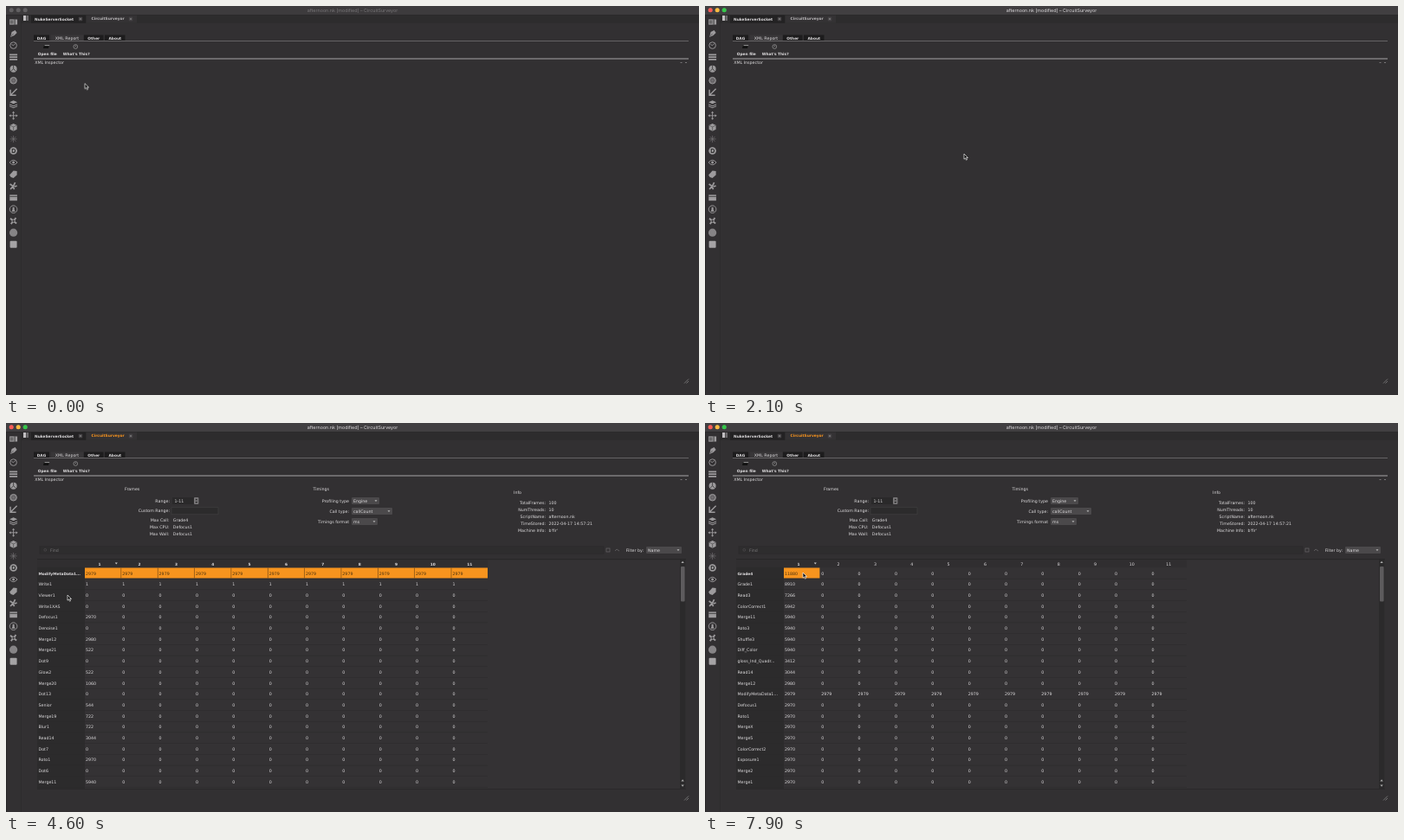
These frames come from a looping animation (800x450 px, 8 s). An HTML page:

```html
<!DOCTYPE html>
<html lang="en">
<head>
<meta charset="utf-8">
<title>XML report viewer</title>
<style>
html, body { margin: 0; width: 100%; height: 100%; overflow: hidden; background: #323032; }
svg { display: block; width: 800px; height: 450px; }
text { font: 4.75px "DejaVu Sans", sans-serif; fill: #dedcde; text-rendering: geometricPrecision; white-space: pre; }
.b { font-size: 4.35px; font-weight: bold; }
.mid { text-anchor: middle; }
.end { text-anchor: end; }
.title { font: 5.35px Inter, sans-serif; text-anchor: middle; }
.tiny { font-size: 2.9px; }
.soft { fill: #bab8ba; }
.dim { fill: #787678; }
.hot { fill: #f7941e; }
.dark { fill: #49300f; }
.ico { fill: none; stroke: #9d9b9d; stroke-width: .9; }
.ico .f { fill: #9d9b9d; stroke: none; }

#active, #lights, #report, #plain, #rowTop, #sorted, #cell, #arrow, #cross { animation: 8s step-end infinite; }
#active { animation-name: active; }
#lights { animation-name: lights; }
#report { animation-name: report; }
#plain { animation-name: plain; }
#rowTop { animation-name: rowTop; }
#sorted { animation-name: sorted; }
#cell { animation-name: cell; }
#arrow { animation-name: arrow; }
#cross { animation-name: cross; }
#dialog { transform-origin: 398px 222px; animation: dialog 8s linear infinite; }
#pointer { animation: pointer 8s ease-in-out infinite; }

@keyframes active { 0% { visibility: hidden } 6.25%, 100% { visibility: visible } }
/* The window buttons go grey while the dialog is up. */
@keyframes lights { 0% { visibility: hidden } 6.25% { visibility: visible } 11.25% { visibility: hidden } 24%, 100% { visibility: visible } }
@keyframes report { 0% { visibility: hidden } 30%, 100% { visibility: visible } }
@keyframes plain { 0% { visibility: hidden } 30% { visibility: visible } 50%, 100% { visibility: hidden } }
@keyframes rowTop { 0% { visibility: hidden } 50% { visibility: visible } 68.75%, 100% { visibility: hidden } }
@keyframes sorted { 0% { visibility: hidden } 68.75% { visibility: visible } 93.75%, 100% { visibility: hidden } }
@keyframes cell { 0% { visibility: hidden } 93.75%, 100% { visibility: visible } }
@keyframes arrow { 0% { visibility: visible } 43.75% { visibility: hidden } 46.25%, 100% { visibility: visible } }
@keyframes cross { 0% { visibility: hidden } 43.75% { visibility: visible } 46.25%, 100% { visibility: hidden } }
@keyframes dialog {
  0%, 11.25% { opacity: 0; transform: scale(.92) }
  12.5% { opacity: .66; transform: scale(1) }
  13.75%, 23.1% { opacity: 1; transform: scale(1.08) }
  24.6%, 100% { opacity: 0; transform: scale(1.08) }
}
@keyframes pointer {
  0%, 2.5% { transform: translate(91px, 89.5px) }
  7.5% { transform: translate(55px, 49px) }
  12.5%, 15.6% { transform: translate(53px, 47.5px) }
  20%, 23.1% { transform: translate(338px, 201px) }
  26.25% { transform: translate(299px, 171px) }
  43.75%, 46.25% { transform: translate(83px, 180.5px) }
  48.75%, 56.25% { transform: translate(76px, 172px) }
  57.5%, 61.25% { transform: translate(71px, 199px) }
  66.25%, 71.25% { transform: translate(107px, 160px) }
  78.75%, 90% { transform: translate(75.5px, 171.5px) }
  93.1%, 100% { transform: translate(113px, 173px) }
}
</style>
</head>
<body>
<svg id="stage" viewBox="0 0 800 450"></svg>
<script>
const APP = "CircuitSurveyor";
const COLS = 11, COL_W = 42.35, ROW_H = 12.7, LEFT = 91, TOP = 167.5;

// Text is placed by its vertical centre.
const text = (x, y, s, cls = "") => `<text x="${x}" y="${y + 1.7}" class="${cls}">${s}</text>`;
const rect = (x, y, w, h, fill, extra = "") =>
  `<rect x="${x}" y="${y}" width="${w}" height="${h}" fill="${fill}" ${extra}/>`;
const circle = (x, y, r, fill, extra = "") => `<circle cx="${x}" cy="${y}" r="${r}" fill="${fill}" ${extra}/>`;
const path = (d, extra = "") => `<path d="${d}" ${extra}/>`;
const group = (id, body) => `<g id="${id}">${body}</g>`;

const lights = colors => colors.map((c, i) => circle(6.2 + i * 8, 4.8, 2.5, c)).join("");
const greyLights = lights(["#626062", "#626062", "#626062"]);
const titleText = cls => text(400, 4.8, `afternoon.nk [modified] – ${APP}`, "title " + cls);

// Toolbar glyphs, each centred on 0,0.
const glyphs = [
  '<path class="f" d="M-4.5-3H4.5V3H-4.5Z"/><path stroke="#333" d="M-4-1H0M-4 1H0M1.5-3V3"/>',
  '<path class="f" d="M-3.5 4-2-2 2-4 4-1 1 2Z"/><path stroke="#333" stroke-width=".6" d="M-3 3 0 0"/>',
  '<circle r="3.8"/><path d="M0 0 2-2M-2-1 0 0"/>',
  '<path stroke-width="1.7" d="M-4.5-2.7H4.5M-4.5 0H4.5M-4.5 2.7H4.5"/>',
  '<circle class="f" r="4"/><path stroke="#333" stroke-width=".8" d="M0-4V0L-3 3M0 0 3 3"/>',
  '<circle r="3.8" fill="#747274"/><circle r="1.8" stroke="#5c5a5c"/>',
  '<path stroke-width="1.4" d="M4-4-3 3M-3.5-3V3.5H3"/>',
  '<path class="f" d="M0-4 4.5-2 0 0-4.5-2ZM-4.5 0 0 2 4.5 0V1L0 3-4.5 1ZM-4.5 2 0 4 4.5 2V3L0 5-4.5 3Z"/>',
  '<path d="M-4 0H4M0-4V4"/><path class="f" d="M-5 0-3-1.6V1.6ZM5 0 3-1.6V1.6ZM0-5-1.6-3H1.6ZM0 5-1.6 3H1.6Z"/>',
  '<path class="f" d="M0-4.3 4-2.3V2.3L0 4.3-4 2.3V-2.3Z"/><path stroke="#444" stroke-width=".6" d="M-4-2.3 0-.5 4-2.3M0-.5V4"/>',
  '<path stroke="#747274" stroke-width=".7" d="M-4 0H4M0-4V4M-2.8-2.8 2.8 2.8M-2.8 2.8 2.8-2.8"/>',
  '<circle class="f" r="4.3"/><path stroke="#333" stroke-width="1.1" d="M-1.3-2V2H0Q2 2 2 0T0-2Z"/>',
  '<path d="M-4.5 0Q0-5.4 4.5 0Q0 5.4-4.5 0Z"/><circle class="f" r="1.4"/>',
  '<path class="f" d="M-4.5 1 0-4 4-3.5 4 1 0 4.5-3 3.5Z"/>',
  '<path stroke-width="1.7" d="M-3.5 4 0 0M-4-2-1 0 1 4M0 0 2-4M1 1 4 0"/>',
  '<path class="f" d="M-4.3-3.2H4.3V3.6H-4.3Z"/><path stroke="#333" stroke-width=".8" d="M-4.3-1.2H4.3"/>',
  '<circle r="4.3"/><path class="f" d="M-1-2.5H1V0L2 2.7H-2L-1 0Z"/>',
  '<path stroke-width="1.9" d="M-3.6-2.8-1-1M2.8-3.6 1-1M3.6 2.8 1 1M-2.8 3.6-1 1"/><circle r="1.6"/>',
  '<circle r="4.6" fill="#868486" stroke="none"/>',
  '<rect x="-4" y="-4" width="8" height="8" rx="1" fill="#a5a3a5" stroke="none"/>'
];
const toolbar = glyphs.map((g, i) =>
  `<g class="ico" transform="translate(8.6 ${(18.5 + 13.54 * i).toFixed(2)})">${g}</g>`).join("");

const closeBox = x => rect(x - 2.2, 12.8, 4.4, 4.4, "#454345") +
  path(`M${x - 1} 14l2 2m0-2l-2 2`, 'stroke="#888" stroke-width=".6"');

const subTab = (x, w, s, on) => rect(x, 33.5, w, 7, on ? "#383638" : "#1d1c1d") +
  text(x + w / 2, 37.3, s, on ? "mid" : "mid b");

const frame =
  rect(0, 0, 800, 450, "#323032") +
  rect(0, 0, 800, 10, "#3d3b3d") +
  greyLights + titleText("dim") +
  group("active", rect(0, 0, 800, 10, "#413f41") + greyLights + titleText("")) +
  group("lights", lights(["#fc5b57", "#fdbc40", "#34c84a"])) +
  rect(0, 10, 800, .7, "#272627") + rect(0, 10, 1, 440, "#282728") +
  rect(17, 10.5, 783, 9.5, "#2d2c2d") + rect(17, 10, .6, 440, "#2b2a2b") +
  toolbar +
  rect(20, 11, 3, 6, "#c0bec0") + rect(23.4, 11, 2.6, 6, "#6c6a6c") +
  rect(29, 10.7, 63, 9, "#232223") + rect(93, 10.7, 58, 9, "#343234") +
  text(33, 15, "NukeServerSocket", "b") + text(98.5, 14.7, APP, "b soft") +
  closeBox(86) + closeBox(144) +
  subTab(32, 18, "DAG") + subTab(52, 37, "XML Report", true) +
  subTab(90, 22.5, "Other") + subTab(114, 23.5, "About") +
  rect(32, 40, 756, 1, "#656365") + rect(32, 60.5, 756, 1, "#a5a3a5") +
  path("M44 45h6l-1 4h-6z", 'fill="#111"') + path("M44.5 45.6h5.6", 'stroke="#bbb" stroke-width=".8"') +
  circle(80.3, 47, 2.4, "none", 'stroke="#aaa" stroke-width=".6"') + path("M80.3 45.6v1.6", 'stroke="#aaa" stroke-width=".7"') +
  text(36.8, 55, "Open file", "b") + text(65.7, 55, "What's This?", "b") +
  text(33.2, 65.3, "XML Inspector") +
  rect(778.5, 65, 2, .8, "#8a888a") + rect(784, 65, 2, .8, "#8a888a") +
  path("M783 436.5l5-5M785.5 436.5l2.5-2.5", 'stroke="#858385" stroke-width=".8"');

const combo = (x, y, w, s) => rect(x, y - 4, w, 8, "#4b494b", 'rx="1"') + text(x + 2, y, s) +
  path(`M${x + w - 5.5} ${y - .8}h3l-1.5 1.8z`, 'fill="#bbb"');
const pairs = (xr, xl, y, step, list) => list.map(([k, v], i) =>
  text(xr, y + i * step, k, "end") + text(xl, y + i * step, v)).join("");

const form =
  rect(95, 11, 45, 8, "#343234") + text(98.5, 14.7, APP, "b hot") +
  text(137, 76.2, "Frames") + text(354.5, 76.2, "Timings") + text(586, 80, "Info") +
  rect(192, 86, 31, 8, "#2a292a") + rect(217, 86, 5.5, 8, "#777577", 'rx="1"') +
  path("M218.4 89.2l1.4-1.7 1.4 1.7zM218.4 91l1.4 1.7 1.4-1.7z", 'fill="#222"') +
  rect(191, 97.8, 54, 8, "#2c2b2c", 'stroke="#464446" stroke-width=".5"') +
  pairs(189, 194.5, 90.2, 0, [["Range:", "1-11"]]) + text(189, 101.6, "Custom Range:", "end") +
  pairs(188.5, 192.8, 112.2, 8, [["Max Call:", "Grade4"], ["Max CPU:", "Defocus1"], ["Max Wall:", "Defocus1"]]) +
  pairs(396, 0, 90, 12, [["Profiling type", ""], ["Call type:", ""], ["Timings format", ""]]) +
  combo(399, 90, 32, "Engine") + combo(399, 102, 47, "callCount") + combo(399, 114, 30, "ms") +
  pairs(623, 626.5, 92, 8, [["TotalFrames:", "100"], ["NumThreads:", "10"], ["ScriptName:", "afternoon.nk"],
    ["TimeStored:", "2022-04-17 14:57:21"], ["Machine Info:", "b'fir'"]]) +
  rect(39, 142.8, 651, 8.4, "#2e2d2e", 'stroke="#282728" stroke-width=".5"') +
  circle(45.3, 146.8, 1.4, "none", 'stroke="#555355" stroke-width=".6"') + text(51, 147, "Find", "dim") +
  rect(693, 145, 4, 4, "none", 'stroke="#686668" stroke-width=".7"') +
  path("M703 148l2-2 3 2", 'fill="none" stroke="#686668" stroke-width=".8"') +
  text(736, 147, "Filter by:", "end") + combo(739, 147, 41, "Name") +
  rect(36, 157.5, 749, 266, "#343234") + rect(36, 157.3, 749, .8, "#242324") +
  rect(36, 158, 520, 9.2, "#302e30") + rect(36, 167, 55, 256, "#2c2b2c") +
  rect(778, 158, 6.5, 265, "#2b2a2b") + rect(779, 166, 4.6, 40.5, "#5d5b5d", 'rx="1"') +
  path("M779.4 162l1.7-2.3 1.7 2.3zM779.4 414.5l1.7-2.3 1.7 2.3zM779.4 418.5l1.7 2.3 1.7-2.3z", 'fill="#aaa"') +
  rect(36, 423, 749, .7, "#272627");

const parse = s => s.split(" ").map(r => r.split(":"));
const loaded = parse("ModifyMetaData1...:2979 Write1:1 Viewer1:0 Write1XAS:0 Defocus1:2970 Denoise1:0 Merge12:2980 " +
  "Merge21:522 Dot9:0 Glow2:522 Merge20:1060 Dot13:0 Senior:544 Merge19:722 Blur1:722 Read14:3044 Dot7:0 " +
  "Roto1:2970 Dot6:0 Merge11:5940");
const ranked = parse("Grade4:11880 Grade1:8910 Read3:7266 ColorCorrect1:5942 Merge11:5940 Roto3:5940 Shuffle3:5940 " +
  "Diff_Color:5940 gloss_Ind_Quadr...:3412 Read14:3044 Merge12:2980 ModifyMetaData1...:2979 Defocus1:2970 Roto1:2970 " +
  "MergeX:2970 Merge5:2970 ColorCorrect2:2970 Exposure1:2970 Merge2:2970 Merge1:2970");

// Highlights `width` cells of row `sel`.
function table(rows, sel = -1, width = COLS) {
  let out = path("M125.8 161.6h3l-1.5 1.8z", 'fill="#ccc"');
  for (let c = 0; c < COLS; c++) {
    const bold = sel >= 0 && c < width ? " b" : "";
    out += text(c ? 111.7 + COL_W * c : 108, 162.8, c + 1, "mid" + bold);
  }
  rows.forEach(([name, value], r) => {
    const y = TOP + r * ROW_H, mid = y + 6.3, on = r === sel;
    out += rect(36, y + ROW_H - .3, 520, .5, "#2a292a");
    if (on) out += rect(LEFT, y, width === 1 ? 41.4 : 465, 12, "#f7941e");
    out += text(37.5, mid, name, on ? "b" : "");
    for (let c = 0; c < COLS; c++) {
      const lit = on && c < width;
      const same = name.startsWith("Modify") || name === "Write1";
      if (lit && c) out += rect(LEFT + COL_W * c - .8, y, .6, 12, "#6b4314");
      out += text((LEFT + .9 + COL_W * c).toFixed(2), mid, c && !same ? 0 : value, lit ? "dark" : "");
    }
  });
  return out;
}

const files = ["reading.xml", "profile_noon.xml", "profile_late.xml", "sample_comp_long.xml", "sample_comp_two.xml"];
const dialog =
  rect(279, 171, 238, 105, "#000", 'rx="4" opacity=".14"') +
  rect(281, 170, 234, 102, "#2d2b2d", 'rx="2"') + rect(281, 170, 234, 6, "#343234", 'rx="2"') +
  ["#6b5150", "#6b5f4c", "#4c8a56"].map((c, i) => circle(284.5 + i * 4, 173, 1.2, c)).join("") +
  text(398, 173, "Open File", "tiny mid dim") +
  [288, 294.5, 301, 307.5].map(x => circle(x, 182.3, 1.7, "#a5a3a5")).join("") +
  rect(285, 187, 41, 63, "#302e30") + rect(327, 187, 184, 63, "#302e30") +
  ["Home", "Work", "Comp"].map((s, i) => rect(286.5, 188 + i * 5.6, 4, 4, "#a9a7a9") + text(293, 190 + i * 5.6, s, "tiny dim")).join("") +
  text(329, 188.8, "Name", "tiny soft") + text(414, 188.8, "Size", "tiny soft") + text(428, 188.8, "Modified", "tiny soft") +
  files.map((s, i) => text(329, 192.3 + i * 3, s, "tiny") + text(414, 192.3 + i * 3, "82 KB", "tiny") +
    text(428, 192.3 + i * 3, "4/17/22 2:57 PM", "tiny")).join("") +
  text(286, 252.5, "comp/reports/", "tiny dim") +
  rect(286, 256.7, 223, 3.3, "#2a241d", 'stroke="#7d5020" stroke-width=".5"') + rect(286, 256.6, 91, 3.6, "#d9832a") +
  text(286, 264.6, "Files (*.xml)", "tiny soft") +
  rect(473, 262.4, 16, 4.6, "#4b494b", 'rx="1"') + rect(492, 262.4, 17, 4.6, "#4b494b", 'rx="1"') +
  text(481, 264.7, "Open", "tiny mid soft") + text(500.5, 264.7, "Cancel", "tiny mid soft");

const pointer =
  group("arrow", path("M0 0V6.2L1.5 4.9 2.5 7.2 3.6 6.7 2.6 4.5H4.5Z", 'fill="#111" stroke="#eee" stroke-width=".7"')) +
  group("cross", path("M-3.5 0H3.5M0-3.5V3.5", 'stroke="#111" stroke-width="2.6"') +
    path("M-3.5 0H3.5M0-3.5V3.5", 'stroke="#eee" stroke-width="1.1"'));

document.getElementById("stage").innerHTML =
  frame +
  group("report", form) +
  group("plain", table(loaded)) +
  group("rowTop", table(loaded, 0)) +
  group("sorted", table(ranked, 11)) +
  group("cell", table(ranked, 0, 1)) +
  group("dialog", dialog) +
  group("pointer", pointer);
</script>
</body>
</html>
```
